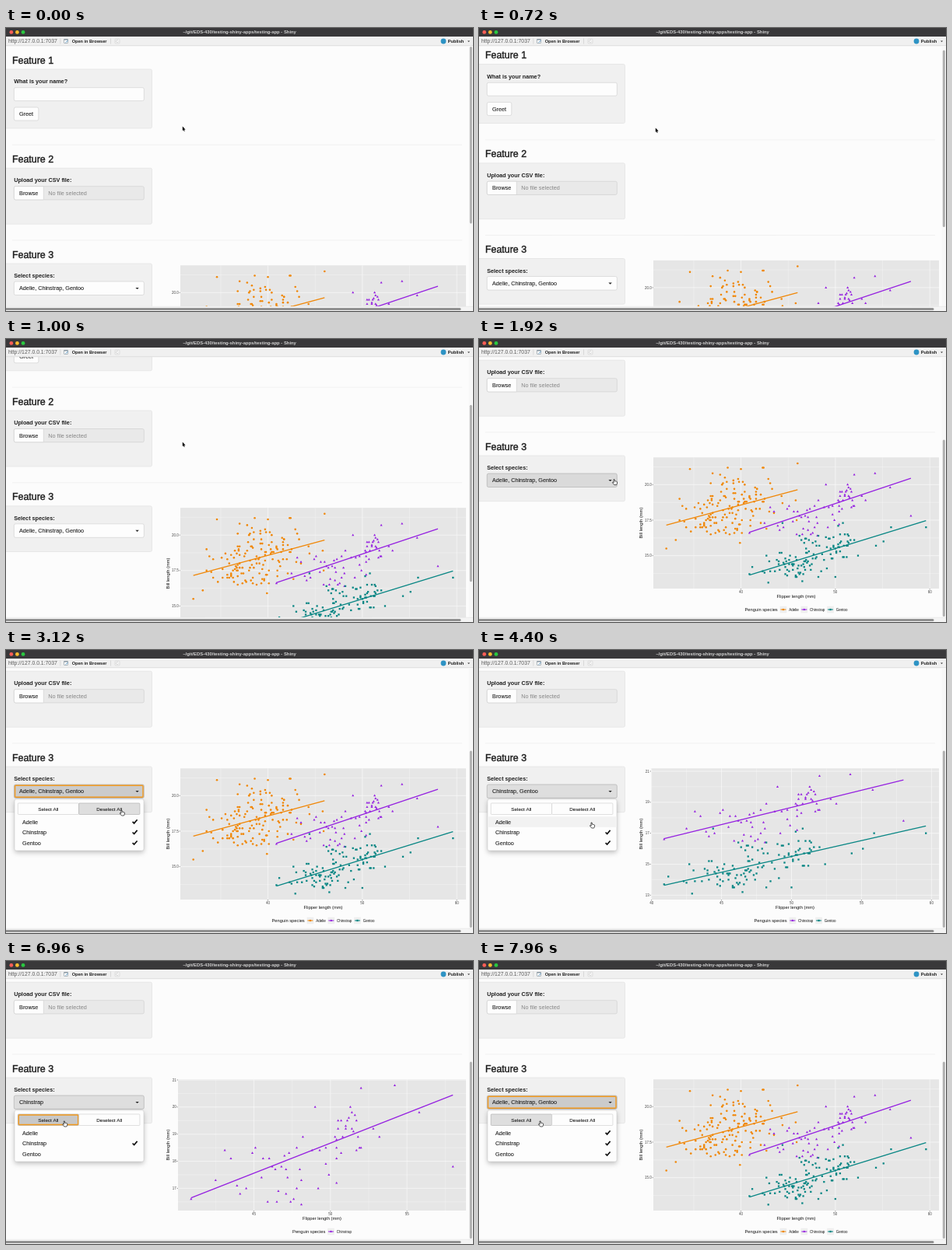
Write an HTML page with a canvas that moves like this. It is 600 px wide and 364 px high and loops after 8 s.

```html
<!DOCTYPE html>
<html lang="en">
<head>
<meta charset="utf-8">
<title>Shiny app</title>
<style>
  html, body { margin: 0; width: 100%; height: 100%; overflow: hidden; background: #fcfcfc; }
  canvas { display: block; width: 600px; height: 364px; }
</style>
</head>
<body>
<canvas id="stage"></canvas>
<script>
const W = 600, H = 364, LOOP = 8000, MAX_SCROLL = 153;
const canvas = document.getElementById('stage');
const ctx = canvas.getContext('2d');
const dpr = window.devicePixelRatio || 1;
canvas.width = W * dpr;
canvas.height = H * dpr;

const SANS = '"Liberation Sans", Arial, sans-serif';
const BODY = 7.25, SMALL = 6.25, AXIS = 5.75, TICK = 4.5;
const RING = '#f29a1f';

// ---------- drawing helpers ----------
function text(str, x, y, size, { color = '#1f1f1f', weight = 400, align = 'left', thicken = 0 } = {}) {
  ctx.font = `${weight} ${size}px ${SANS}`;
  ctx.textAlign = align;
  ctx.fillStyle = color;
  ctx.fillText(str, x, y);
  if (thicken) {
    ctx.strokeStyle = color;
    ctx.lineWidth = thicken;
    ctx.strokeText(str, x, y);
  }
  return ctx.measureText(str).width;
}

function rect(x, y, w, h, fill) {
  ctx.fillStyle = fill;
  ctx.fillRect(x, y, w, h);
}

function box(x, y, w, h, fill, border, radius = 2, line = 0.6) {
  ctx.beginPath();
  ctx.roundRect(x, y, w, h, radius);
  if (fill) { ctx.fillStyle = fill; ctx.fill(); }
  if (border) { ctx.strokeStyle = border; ctx.lineWidth = line; ctx.stroke(); }
}

function path(points, close) {
  ctx.beginPath();
  points.forEach(([x, y], i) => i ? ctx.lineTo(x, y) : ctx.moveTo(x, y));
  if (close) ctx.closePath();
}

function line(x1, y1, x2, y2, color, width) {
  path([[x1, y1], [x2, y2]]);
  ctx.strokeStyle = color;
  ctx.lineWidth = width;
  ctx.stroke();
}

function dot(x, y, r, color) {
  ctx.beginPath();
  ctx.arc(x, y, r, 0, Math.PI * 2);
  ctx.fillStyle = color;
  ctx.fill();
}

function triangle(x, y, color) {
  path([[x, y - 1.75], [x + 1.55, y + 1], [x - 1.55, y + 1]], true);
  ctx.fillStyle = color;
  ctx.fill();
}

function caret(x, y, w) {
  path([[x - w, y - w / 2], [x + w, y - w / 2], [x, y + w / 2]], true);
  ctx.fillStyle = '#222';
  ctx.fill();
}

// ---------- data ----------
function seeded(seed) {
  return () => {
    seed = (seed + 0x6D2B79F5) | 0;
    let v = Math.imul(seed ^ (seed >>> 15), 1 | seed);
    v = (v + Math.imul(v ^ (v >>> 7), 61 | v)) ^ v;
    return ((v ^ (v >>> 14)) >>> 0) / 4294967296;
  };
}

const tenth = v => Math.round(v * 10) / 10;
const extent = values => [Math.min(...values), Math.max(...values)];

// Fills the extent of the edge points from two normal clusters, used in turn.
function scatter(seed, count, edge, clusters) {
  const rnd = seeded(seed), out = [...edge];
  const gauss = () => Math.sqrt(-2 * Math.log(1 - rnd())) * Math.cos(2 * Math.PI * rnd());
  const [x0, x1] = extent(edge.map(p => p[0]));
  const [y0, y1] = extent(edge.map(p => p[1]));
  while (out.length < count) {
    const { x: [mx, sx], y: [my, sy] } = clusters[out.length % 2];
    const x = tenth(mx + sx * gauss()), y = tenth(my + sy * gauss());
    if (x > x0 && x < x1 && y > y0 && y < y1) out.push([x, y]);
  }
  return out;
}

const SPECIES = [
  {
    name: 'Adelie', color: '#f08707', fit: [11.41, 0.179], mark: (x, y, c) => dot(x, y, 1.3, c),
    points: scatter(7, 151,
      [[46, 21.5], [32.1, 15.5], [34.6, 21.1], [38.6, 21.2], [42.3, 21.2], [33.1, 16.1], [33.5, 19], [45.8, 18.9]],
      [{ x: [37.3, 2], y: [17.6, 0.9] }, { x: [40.4, 2.2], y: [19.1, 1] }]),
  },
  {
    name: 'Chinstrap', color: '#9521e0', fit: [7.57, 0.222], mark: triangle,
    points: scatter(12, 68,
      [[40.9, 16.6], [58, 17.8], [54.2, 20.8], [48.1, 16.4], [55.8, 19.8], [52, 20.7], [43.5, 18.1], [42.5, 17.3]],
      [{ x: [46.4, 1.9], y: [17.6, 0.75] }, { x: [51, 1.5], y: [19.2, 0.75] }]),
  },
  {
    name: 'Gentoo', color: '#088684', fit: [5.25, 0.205], mark: (x, y, c) => rect(x - 1.15, y - 1.15, 2.3, 2.3, c),
    points: scatter(21, 123,
      [[59.6, 17], [40.9, 13.7], [55.9, 17], [54.3, 15.7], [55.1, 16], [50.8, 17.3], [44.4, 17.3], [42.9, 13.1]],
      [{ x: [45.6, 2], y: [14.25, 0.55] }, { x: [49.4, 2], y: [15.7, 0.7] }]),
  },
];

// ---------- plot ----------
const VIEWS = {
  all: { species: SPECIES, left: 224, x: [40, 10], y: [15, 2.5], digits: 1 },
  two: { species: SPECIES.slice(1), left: 221, x: [40, 5], y: [13, 2], digits: 0 },
  one: { species: [SPECIES[1]], left: 221, x: [45, 5], y: [17, 1], digits: 0 },
};

function axis(values, from, to) {
  const [min, max] = extent(values), pad = (max - min) * 0.05;
  const lo = min - pad, hi = max + pad;
  return { lo, hi, at: v => from + (v - lo) / (hi - lo) * (to - from) };
}

function ticks(scale, [start, step]) {
  const out = [];
  for (let k = -8; k <= 16; k++) {
    const v = start + k * step / 2;
    if (v >= scale.lo && v <= scale.hi) out.push({ v, major: k % 2 === 0 });
  }
  return out;
}

function drawPlot(view) {
  const { left, species } = view, right = 591, top = 305.3, bottom = 474;
  const all = species.flatMap(s => s.points);
  const sx = axis(all.map(p => p[0]), left, right);
  const sy = axis(all.map(p => p[1]), bottom, top);
  const middle = (left + right) / 2;

  rect(left, top, right - left, bottom - top, '#e6e6e6');
  for (const { v, major } of ticks(sx, view.x)) {
    const x = sx.at(v);
    line(x, top, x, bottom, '#fafafa', major ? 0.7 : 0.35);
    if (!major) continue;
    line(x, bottom, x, bottom + 1.5, '#444', 0.5);
    text(v, x, bottom + 6, TICK, { color: '#444', align: 'center' });
  }
  for (const { v, major } of ticks(sy, view.y)) {
    const y = sy.at(v);
    line(left, y, right, y, '#fafafa', major ? 0.7 : 0.35);
    if (!major) continue;
    line(left - 1.5, y, left, y, '#444', 0.5);
    text(v.toFixed(view.digits), left - 2.2, y + 1.6, TICK, { color: '#444', align: 'right' });
  }

  for (const s of species) for (const [x, y] of s.points) s.mark(sx.at(x), sy.at(y), s.color);
  for (const s of species) {
    const [x0, x1] = extent(s.points.map(p => p[0]));
    const fit = x => s.fit[0] + s.fit[1] * x;
    line(sx.at(x0), sy.at(fit(x0)), sx.at(x1), sy.at(fit(x1)), s.color, 1.3);
  }

  text('Flipper length (mm)', middle, 486.3, AXIS, { color: '#111', align: 'center' });
  ctx.save();
  ctx.translate(210.3, (top + bottom) / 2);
  ctx.rotate(-Math.PI / 2);
  text('Bill length (mm)', 0, 0, AXIS, { color: '#111', align: 'center' });
  ctx.restore();
  drawLegend(species, middle);
}

function drawLegend(species, middle) {
  const title = 'Penguin species', key = 8.6, gap = 2.9, y = 501;
  const width = (str, size) => {
    ctx.font = `400 ${size}px ${SANS}`;
    return ctx.measureText(str).width;
  };
  const total = width(title, AXIS) + species.reduce((sum, s) => sum + key + 2 * gap + width(s.name, TICK), 0);
  let x = middle - total / 2;
  x += text(title, x, y + 2, AXIS, { color: '#111' }) + gap;
  for (const s of species) {
    rect(x, y - key / 2, key, key, '#eeeeee');
    line(x + 0.8, y, x + key - 0.8, y, s.color, 1.2);
    s.mark(x + key / 2, y, s.color);
    x += key + gap;
    x += text(s.name, x, y + 1.6, TICK, { color: '#111' }) + gap;
  }
}

// ---------- timeline ----------
const clamp = v => Math.max(0, Math.min(1, v));
const ease = v => { v = clamp(v); return v * v * (3 - 2 * v); };

// Moves of the pointer: start, end, x, y.
const MOVES = [
  [640, 860, 226.8, 132.6], [1440, 1860, 173.6, 180.6], [2260, 2900, 148.4, 206], [3240, 3680, 144.6, 222],
  [4520, 4880, 144, 246.5], [5680, 6380, 74.8, 206], [7020, 7300, 78.6, 206],
];

function pointerAt(t) {
  let x = 226.8, y = 126.6;
  for (const [start, end, nx, ny] of MOVES) {
    const p = ease((t - start) / (end - start));
    x += (nx - x) * p;
    y += (ny - y) * p;
  }
  return { x, y };
}

function stateAt(t) {
  const pointer = pointerAt(t);
  const open = t >= 2040;
  const over = (x, y, w, h) => pointer.x >= x && pointer.x < x + w && pointer.y >= y && pointer.y < y + h;
  const phase = (a, b, c) => t < a || t >= c ? 'all' : t < b ? 'two' : 'one';
  return {
    pointer, open, over,
    scroll: MAX_SCROLL * ease((t - 640) / 655),
    chosen: VIEWS[phase(3800, 5000, 7000)].species,
    view: VIEWS[phase(4160, 5360, 7200)],
    focused: open && (t < 3800 || t >= 7000),
    pressed: t >= 6880 && t < 7000,
    hand: over(10, 173, 167, open ? 85 : 18),
  };
}

// ---------- page ----------
function heading(n, y) {
  text('Feature ' + n, 8, y, 12.4, { thicken: 0.42 });
}

function well(y, h) {
  box(-2, y, 189.5, h, '#f0f0f0', '#dddddd');
}

function label(str, y) {
  text(str, 10.2, y, BODY, { weight: 700 });
}

function drawForms() {
  heading(1, 45.5);
  well(53, 76);
  label('What is your name?', 71);
  box(10.3, 76.7, 167, 17, '#fdfdfd', '#cccccc');
  box(10.3, 102, 31.5, 17, '#fdfdfd', '#cccccc');
  text('Greet', 26, 113, BODY, { align: 'center', thicken: 0.1 });
  line(8, 150.3, 586, 150.3, '#e9e9e9', 0.6);

  heading(2, 172.7);
  well(180.2, 72);
  label('Upload your CSV file:', 198.2);
  box(10.3, 203.7, 167, 17.2, '#e9e9e9', '#cccccc');
  box(10.3, 203.7, 38, 17.2, '#fdfdfd', '#cccccc', [2, 0, 0, 2]);
  text('Browse', 29.2, 214.8, BODY, { align: 'center', thicken: 0.1 });
  text('No file selected', 54.3, 214.8, BODY, { color: '#858585' });
  line(8, 273, 586, 273, '#e9e9e9', 0.6);

  heading(3, 295.5);
  well(303, 58.7);
  label('Select species:', 321);
}

function drawSelect(s) {
  const y = 173;
  const fill = s.focused ? '#cbcbcb' : s.open ? '#dedede' : s.over(10, y, 167, 18) ? '#dadada' : '#fdfdfd';
  const border = s.open || s.hand ? '#a9a9a9' : '#cccccc';
  ctx.save();
  ctx.translate(0, MAX_SCROLL - s.scroll);
  box(10.3, y, 167, 17.5, fill, border);
  if (s.focused) box(11.6, y + 1.2, 164.4, 15.1, null, RING, 1, 1.4);
  text(s.chosen.map(sp => sp.name).join(', '), 17, y + 11.4, BODY, { thicken: 0.1 });
  caret(168.6, y + 9, 2.2);
  ctx.restore();
}

function drawMenu(s) {
  ctx.save();
  ctx.shadowColor = 'rgba(0,0,0,0.25)';
  ctx.shadowBlur = 6 * dpr;
  ctx.shadowOffsetY = 2.5 * dpr;
  box(11, 192, 166, 66, '#fdfdfd', null);
  ctx.restore();
  box(11, 192, 166, 66, null, '#c6c6c6', 2, 0.5);

  ['Select All', 'Deselect All'].forEach((name, i) => {
    const x = 15.3 + i * 78.3, hover = s.over(x, 197, 78.3, 14.5);
    const pressed = s.pressed && hover;
    box(x, 197, 78.3, 14.5, pressed ? '#c8c8c8' : hover ? '#dedede' : '#fdfdfd', hover ? '#a9a9a9' : '#cccccc', 1);
    if (pressed) box(x + 1, 198, 76.3, 12.5, null, RING, 1, 1.4);
    text(name, x + 39.1, 206.6, SMALL, { align: 'center', thicken: 0.1 });
  });

  SPECIES.forEach((sp, i) => {
    const y = 214.3 + i * 13.6;
    if (s.over(11, y, 166, 13.6)) rect(11.3, y, 165.4, 13.6, '#f2f2f2');
    text(sp.name, 21, y + 9.3, BODY, { thicken: 0.1 });
    if (!s.chosen.includes(sp)) return;
    path([[162.6, y + 6.6], [164.6, y + 8.6], [168.6, y + 4]]);
    ctx.strokeStyle = '#111';
    ctx.lineWidth = 1.7;
    ctx.stroke();
  });
}

function drawPointer({ pointer, hand }) {
  ctx.save();
  ctx.translate(pointer.x, pointer.y);
  ctx.lineJoin = 'round';
  if (hand) {
    path([[-0.6, 0], [0.5, 0], [0.8, 2.2], [2.8, 2.5], [4, 3.2], [3.9, 5.2], [3.1, 7], [0.1, 7],
      [-1.1, 5.5], [-2.2, 3.9], [-1.5, 3.3], [-0.4, 4.2]], true);
    ctx.fillStyle = '#fff';
    ctx.strokeStyle = '#111';
    ctx.lineWidth = 0.7;
    ctx.fill();
    ctx.stroke();
  } else {
    path([[0, 0], [0, 5.6], [1.2, 4.5], [2, 6.5], [2.9, 6.1], [2.1, 4.2], [3.8, 4.1]], true);
    ctx.fillStyle = '#000';
    ctx.strokeStyle = '#fff';
    ctx.lineWidth = 0.8;
    ctx.stroke();
    ctx.fill();
  }
  ctx.restore();
}

// ---------- window ----------
function drawChrome(scroll) {
  rect(0, 0, W, 11, '#39383a');
  ['#fb5e57', '#fdbc2e', '#29c840'].forEach((c, i) => dot(6.8 + i * 7.6, 5.4, 2.4, c));
  text('~/git/EDS-430/testing-shiny-apps/testing-app - Shiny', 300, 7.4, 5.87,
    { color: '#d2d2d2', weight: 700, align: 'center' });

  rect(0, 11, W, 12, '#f0f0f0');
  line(0, 22.7, W, 22.7, '#d2d2d2', 0.6);
  text('http://127.0.0.1:7037', 3, 19.3, 6.85, { color: '#5c5c5c' });
  [69.8, 134.5].forEach(x => line(x, 13.5, x, 20.5, '#c8c8c8', 0.6));

  box(74.5, 14.5, 5, 5, '#fff', '#7d8b96', 0.5);
  rect(74.5, 14.3, 5, 1.2, '#7d8b96');
  line(76.5, 18.6, 79.6, 16.2, '#4a90c2', 0.9);
  text('Open in Browser', 84.7, 19, 5.6, { weight: 700 });

  box(140, 14, 6, 6, '#f4f4f4', '#c9c9c9', 1, 0.5);
  ctx.beginPath();
  ctx.arc(143, 17, 1.7, 0.4, 5.4);
  ctx.strokeStyle = '#c2c2c2';
  ctx.lineWidth = 0.6;
  ctx.stroke();

  dot(562, 17, 3.4, '#2e93c4');
  text('Publish', 567.8, 19, 5.7, { weight: 700 });
  caret(594.5, 17.2, 1.5);

  rect(594.5, 23, 5.5, 336, '#f8f8f8');
  box(595.8, 24 + scroll * 0.69, 3, 227.5, '#b0b0b0', null, 1.5);
  rect(0, 358.3, W, 5.7, '#f4f4f4');
  line(0, 358.3, W, 358.3, '#dedede', 0.5);
  box(-2, 359.9, 586.5, 3, '#909090', null, 1.5);
}

function draw(t) {
  const s = stateAt(t);
  ctx.setTransform(dpr, 0, 0, dpr, 0, 0);
  rect(0, 0, W, H, '#fcfcfc');

  ctx.save();
  ctx.beginPath();
  ctx.rect(0, 23, W, 335.3);
  ctx.clip();
  ctx.save();
  ctx.translate(0, -s.scroll);
  drawForms();
  drawPlot(s.view);
  ctx.restore();
  drawSelect(s);
  if (s.open) drawMenu(s);
  ctx.restore();

  drawChrome(s.scroll);
  drawPointer(s);
}

function loop() {
  draw(performance.now() % LOOP);
  requestAnimationFrame(loop);
}
loop();
</script>
</body>
</html>
```
